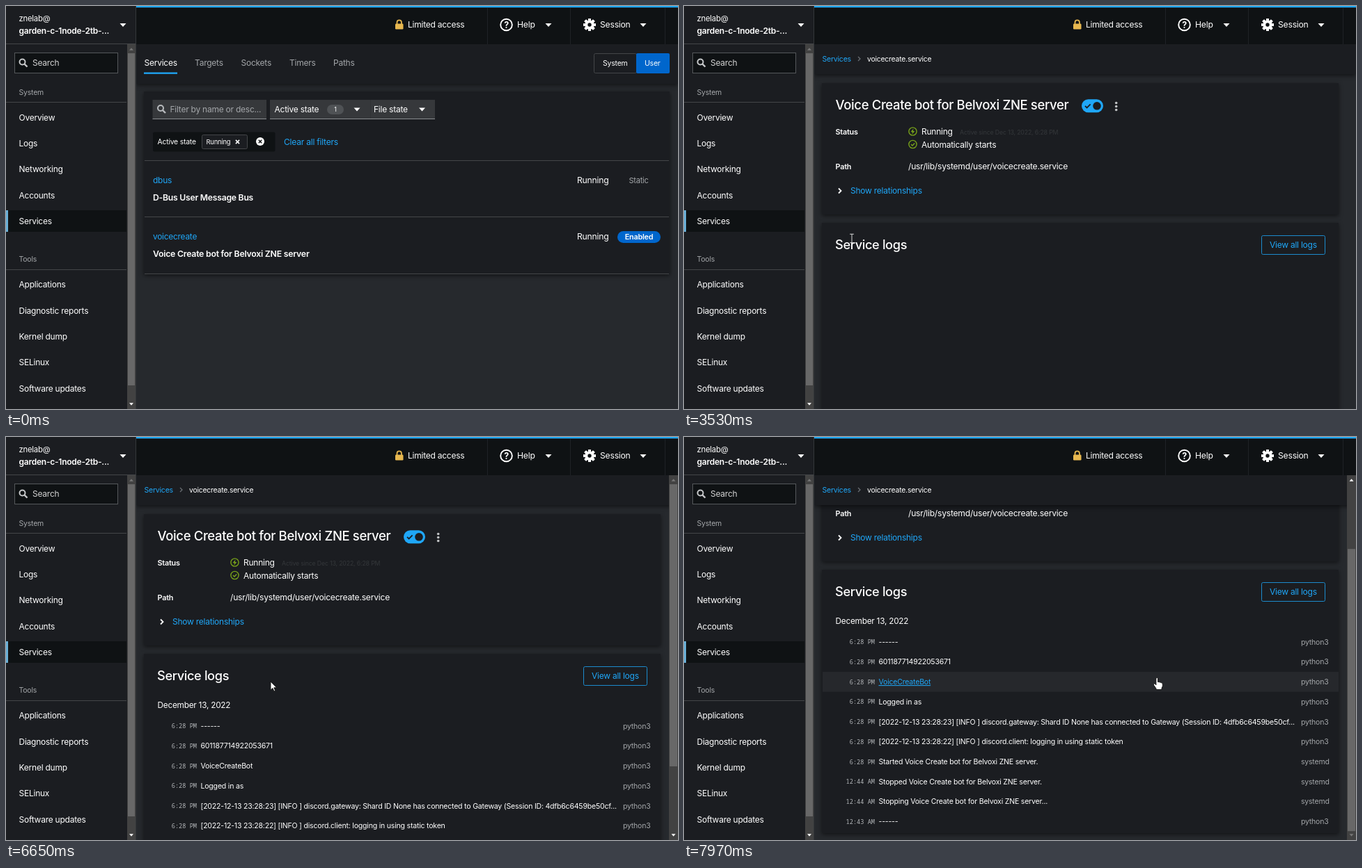
Write an HTML page that moves like this. It is 965 px wide and 580 px high and loops after 8 s.

```html
<!DOCTYPE html>
<html lang="en">
<head>
<meta charset="utf-8">
<title>Service manager</title>
<style>
html, body { margin: 0; height: 100%; overflow: hidden; background: #26292d; }
svg { display: block; width: 100%; height: 100%; }
text { font-family: Inter, Roboto, sans-serif; letter-spacing: -.02em; white-space: pre; }
.mono { font-family: "Noto Sans Mono", "DejaVu Sans Mono", monospace; letter-spacing: 0; }
.card { fill: #1b1d21; filter: drop-shadow(0 2px 3px #0008); }
.hover text.msg { fill: #1fa7f8; text-decoration: underline; }
.hover .row { fill: #26282c; }
</style>
</head>
<body>
<svg id="stage" viewBox="0 0 965 580"></svg>
<script>
const WHITE = '#fff', GREY = '#a3a6a9', BLUE = '#1fa7f8', PANEL = '#1b1d21', DARK = '#0f1214', LINE = '#444649';
const TRACK = '#424242', THUMB = '#686868';
const BOT = 'Voice Create bot for Belvoxi ZNE server';
const ROW_TOP = 401.5, ROW_H = 28.72;

// y is the middle of the capitals
const text = (x, y, s, size = 12, fill = WHITE, extra = '') =>
  `<text x="${x}" y="${y + size * .36}" font-size="${size}" fill="${fill}" ${extra}>${s}</text>`;
const rect = (x, y, w, h, fill, extra = '') =>
  `<rect x="${x}" y="${y}" width="${w}" height="${h}" fill="${fill}" ${extra}/>`;
const path = (d, stroke, width = 1, extra = '') =>
  `<path d="${d}" fill="none" stroke="${stroke}" stroke-width="${width}" ${extra}/>`;
const circle = (x, y, r, fill, extra = '') => `<circle cx="${x}" cy="${y}" r="${r}" fill="${fill}" ${extra}/>`;
const caret = (x, y, fill = WHITE, w = 4.5, h = 2.5) =>
  `<path d="M${x - w} ${y - h}h${2 * w}l${-w} ${2 * h}z" fill="${fill}"/>`;
const lens = (x, y, fill) => path(`M${x + 3} ${y + 3}l4 4`, fill, 2.4) +
  circle(x, y, 4, 'none', `stroke="${fill}" stroke-width="2"`);
const cross = (x, y, r, stroke, w) => path(`M${x - r} ${y - r}l${2 * r} ${2 * r}m0 ${-2 * r}l${-2 * r} ${2 * r}`, stroke, w);
const bold = 'font-weight="600"';

function sidebar() {
  const item = (s, i, top) => text(18.5, top + i * 37.3, s);
  return rect(0, 0, 187, 580, PANEL) +
    text(18.5, 17.5, 'znelab@', 11.3) + text(18.5, 36, 'garden-c-1node-2tb-...', 12, WHITE, bold) +
    caret(168, 27.5) + path('M0 54.5H186', LINE) +
    rect(12.5, 67.5, 148, 29, DARK, 'stroke="#55585b"') + lens(23.5, 80.5, '#c6c8ca') + text(38, 82, 'Search', 12, '#d2d2d2') +
    text(18.5, 124, 'System', 10.5, GREY) + path('M0 138.5H173', LINE) +
    rect(0, 294, 173, 31, DARK) + rect(0, 294, 3, 31, '#6ab0d8') +
    ['Overview', 'Logs', 'Networking', 'Accounts', 'Services'].map((s, i) => item(s, i, 160.5)).join('') +
    text(18.5, 364.5, 'Tools', 10.5, GREY) + path('M0 379.5H173', LINE) +
    ['Applications', 'Diagnostic reports', 'Kernel dump', 'SELinux', 'Software updates']
      .map((s, i) => item(s, i, 401)).join('') +
    rect(174, 55, 12, 525, TRACK) + rect(175, 68, 10, 478, THUMB) +
    caret(180, 62, '#777', 3, -1.7) + caret(180, 573, WHITE, 3, 1.7) +
    path('M186.5 0V580', '#34373a');
}

function header() {
  const teeth = [...Array(8)].map((_, i) =>
    rect(836, 18, 4, 18, WHITE, `rx="1" transform="rotate(${i * 45} 838 27)"`)).join('');
  return rect(187, 0, 778, 55, DARK) + rect(187, 0, 778, 2.2, BLUE) +
    path('M691.5 3V55M810.5 3V55M946.5 3V55', '#1f2226') +
    rect(559, 25.5, 11.5, 8, '#e8b84f', 'rx="1.3"') + path('M561.5 26V23.5a3.2 3.2 0 0 1 6.4 0V26', '#e8b84f', 1.8) +
    text(577, 27, 'Limited access') +
    circle(718.5, 27, 8.3, 'none', `stroke="${WHITE}" stroke-width="1.9"`) +
    text(718.5, 27.2, '?', 12.5, WHITE, 'font-weight="700" text-anchor="middle"') +
    text(734, 27, 'Help', 12.2) + caret(779, 27.5) +
    teeth + circle(838, 27, 6.6, WHITE) + circle(838, 27, 2.7, DARK) +
    text(853, 27, 'Session', 12.2) + caret(915, 27.5);
}

function listPage() {
  const tabs = [['Services', 198.5], ['Targets', 271], ['Sockets', 337.5], ['Timers', 407], ['Paths', 470]];
  return rect(187, 55, 778, 57, PANEL, 'class="card"') +
    tabs.map(([s, x], i) => text(x, 82, s, 12, i ? GREY : WHITE)).join('') + rect(198, 95.5, 48, 2.3, BLUE) +
    rect(844.5, 68.5, 61, 28, PANEL, `rx="2" stroke="${LINE}"`) + text(857, 82.5, 'System', 10.5) +
    rect(905, 68, 48, 29, '#06c', 'rx="2"') + text(917, 82.5, 'User', 10.5) +
    rect(198, 123, 755, 263, PANEL, 'class="card"') +
    rect(210.5, 135, 163.5, 28, '#36383b') + lens(222, 147, '#b8bbbe') +
    text(235.5, 149, 'Filter by name or desc...', 12, GREY) +
    rect(379, 135, 237, 28, '#36383b') + path('M210.5 162.5H374M379 162.5H616', '#8a8d90') +
    text(385.5, 149, 'Active state') + rect(461, 142, 24, 14, '#4f5255', 'rx="7"') +
    text(473, 149, '1', 9, WHITE, 'text-anchor="middle"') + caret(504, 149) + path('M523.5 135V162', '#303235') +
    text(528, 149, 'File state') + caret(597.5, 149) +
    rect(211, 181.5, 175.5, 28, DARK, 'rx="2"') + text(217.5, 195.5, 'Active state', 10.4) +
    rect(281.5, 185.5, 65, 20, PANEL, `rx="2" stroke="${LINE}"`) + text(287.5, 195.5, 'Running', 9.4) +
    cross(332.5, 195.5, 2.6, WHITE, 1.6) + circle(365, 195, 6, WHITE) + cross(365, 195, 2.2, DARK, 1.6) +
    text(399, 195.5, 'Clear all filters', 12.1, BLUE) +
    path('M199 222.5H952M199 303.5H952M199 385.5H952', LINE) +
    text(211, 250.5, 'dbus', 12, BLUE) + text(211, 275.5, 'D-Bus User Message Bus', 12.2, WHITE, bold) +
    text(820, 250.5, 'Running', 12.2) + text(894.5, 251, 'Static', 11, GREY) +
    text(211, 332, 'voicecreate', 11.9, BLUE, 'id="link"') + text(211, 357, BOT, 12.3, WHITE, bold) +
    text(820, 332, 'Running', 12.2) + rect(878, 324, 62, 17, '#06c', 'rx="8.5"') +
    text(909, 332.5, 'Enabled', 10.8, WHITE, bold + ' text-anchor="middle"');
}

function logRows() {
  const rows = [
    '------', '601187714922053671', 'VoiceCreateBot', 'Logged in as',
    '[2022-12-13 23:28:23] [INFO ] discord.gateway: Shard ID None has connected to Gateway (Session ID: 4dfb6c6459be50cf...',
    '[2022-12-13 23:28:22] [INFO ] discord.client: logging in using static token',
    `Started ${BOT}.`, `Stopped ${BOT}.`, `Stopping ${BOT}...`, '------'];
  return rows.map((s, i) => {
    const y = ROW_TOP + ROW_H * (i + .5);
    const time = i < 7 ? '6:28 PM' : i < 9 ? '12:44 AM' : '12:43 AM';
    return '<g class="log">' + rect(199, y - ROW_H / 2, 741, ROW_H, 'none', 'class="row"') +
      text(274, y + .3, time, 8.65, '#b4b7ba', 'class="mono" text-anchor="end"') +
      text(279.5, y, s, 10.55, WHITE, 'class="msg"') +
      text(886, y, i > 5 && i < 9 ? 'systemd' : 'python3', 10.5, GREY) + '</g>';
  }).join('');
}

function detailPage() {
  const green = '#78a21a', ring = y => circle(328.5, y, 5.6, 'none', `stroke="${green}" stroke-width="1.4"`);
  return '<g clip-path="url(#view)"><g id="scroll">' +
    rect(198, 111, 742, 189, PANEL, 'class="card"') +
    text(217.5, 142.5, BOT, 18.5, WHITE, 'font-weight="500"') +
    rect(571, 134.3, 31, 19, BLUE, 'rx="9.5"') + circle(593, 143.8, 5.8, PANEL) + path('M576 143.8l2.6 2.6 5-5', PANEL, 1.8) +
    [139.5, 144.5, 149.5].map(y => circle(620.7, y, 1.8, '#c0c2c4')).join('') +
    text(217.5, 181.5, 'Status', 10.8, WHITE, bold) + ring(180.5) +
    `<path d="M329.5 176.5l-4 4.8h2.5l-.6 3.4 4-4.8h-2.5z" fill="${green}"/>` +
    text(341, 181, 'Running') + text(396, 182, 'Active since Dec 13, 2022, 6:28 PM', 8.8, '#34373a') +
    ring(199) + path('M326 199l2 2 3.2-3.4', green, 1.5) + text(341, 199.5, 'Automatically starts') +
    text(217.5, 231, 'Path', 10.8, WHITE, bold) + text(322, 230.5, '/usr/lib/systemd/user/voicecreate.service', 12.15) +
    path('M222 262.5l3.5 3.5-3.5 3.5', WHITE, 1.8) + text(239, 266, 'Show relationships', 12, BLUE) +
    rect(198, 312, 742, 379, PANEL, 'class="card"') +
    text(217, 343.5, 'Service logs', 18.2, WHITE, 'font-weight="500"') +
    rect(829.5, 330.5, 91, 27, 'none', 'rx="2" stroke="#1c8bcd"') + text(841, 343.8, 'View all logs', 12, BLUE) +
    `<g class="loaded">${text(217.5, 385.5, 'December 13, 2022', 11.8)}${logRows()}</g></g></g>` +
    rect(187, 55, 778, 43, PANEL, 'class="card"') +
    text(198.5, 76, 'Services', 10.5, BLUE) + path('M250 73l3 3-3 3', '#6a6e73', 1.3) +
    text(263, 76, 'voicecreate.service', 10.4) +
    '<g class="loaded">' + rect(952, 55, 13, 525, TRACK) + rect(953, 68, 11, 406, THUMB, 'id="thumb"') +
    `<g id="up">${caret(958.5, 62, 'currentColor', 3, -1.7)}</g><g id="down">${caret(958.5, 573, 'currentColor', 3, 1.7)}</g></g>`;
}

const shape = d => `<path d="${d}" fill="#fff" stroke="#111" stroke-width=".9" stroke-linejoin="round"/>`;
const cursors = {
  arrow: shape('M0 0V12.3L2.9 9.5 5 14 6.8 13.3 4.8 8.8H8.6Z'),
  hand: shape('M-1.6 1.2Q-1.6 0-.3 0T1 1.2V6L3 6.2 5 6.8 7 7.6Q7.8 8 7.8 9.5V12L6.5 15V17H-1.5V15.4L-5 10.5Q-5.6 9-4.3 8.6T-1.6 10.5Z'),
  beam: path('M-2.8-6.2H2.8M0-6.2V6.2M-2.8 6.2H2.8', '#d8d8d8')
};

const stage = document.getElementById('stage');
stage.innerHTML = '<clipPath id="view"><path d="M187 98H965V580H187z"/></clipPath>' +
  rect(187, 55, 778, 525, '#26292d') + `<g id="list">${listPage()}</g><g id="detail">${detailPage()}</g>` +
  header() + sidebar() + Object.keys(cursors).map(c => `<g id="${c}">${cursors[c]}</g>`).join('');

const $ = id => document.getElementById(id);
const show = (el, on) => el.style.display = on ? '' : 'none';
const loaded = document.querySelectorAll('.loaded'), logs = document.querySelectorAll('.log');

// Keys are [step, x, y] and [step, offset]; one step is STEP ms
const START = 488, STEP = 66.1;
const moves = [
  [0, 958, 95], [5, 936, 86], [8, 928, 82], [10, 927, 84], [11, 927, 84], [13, 931, 85], [14, 931, 85], [15, 932.5, 85],
  [29, 932.5, 85], [30, 915, 88], [32, 800, 130], [34, 520, 235], [37, 312, 306], [39, 262, 325], [42, 241, 334.5],
  [58, 241, 334.5], [63, 335, 340], [65, 388, 343], [67, 350, 345], [70, 269, 349.5], [71, 270, 349],
  [75, 300, 343], [76, 314, 340], [78, 260, 338], [79, 270, 340], [80, 270, 340], [82, 246, 339],
  [89, 246, 339], [93, 380, 352], [97, 560, 362], [100, 596, 357], [102, 600, 355], [113, 679.5, 346.5]];
const scrolls = [[99, 0], [100, 38], [101, 85], [102, 112], [103, 121]];

function at(keys, k) {
  const i = keys.findIndex(key => key[0] >= k);
  if (i < 1) return keys[i < 0 ? keys.length - 1 : 0].slice(1);
  const [a, b] = [keys[i - 1], keys[i]], u = (k - a[0]) / (b[0] - a[0]);
  return a.slice(1).map((v, j) => v + (b[j + 1] - v) * u);
}

function draw(now) {
  const k = Math.floor((now % 8000 - START) / STEP);
  const [x, y] = at(moves, k), [offset] = at(scrolls, k);
  const inside = (l, t, r, b) => x >= l && x < r && y >= t && y < b;
  const onList = k < 44, onDetail = k >= 46, hasLogs = k >= 52;

  show($('list'), onList);
  show($('detail'), onDetail);
  loaded.forEach(el => show(el, hasLogs));
  $('scroll').setAttribute('transform', `translate(0 ${-offset})`);
  $('thumb').setAttribute('y', 68 + offset * .77);
  $('up').style.color = offset > 0 ? WHITE : '#777';
  $('down').style.color = offset < 121 ? WHITE : '#777';

  const onLink = onList && inside(211, 325, 275, 340);
  const row = hasLogs && inside(199, 98, 940, 580) ? Math.floor((y + offset - ROW_TOP) / ROW_H) : -1;
  $('link').style.textDecoration = onLink ? 'underline' : '';
  logs.forEach((el, i) => el.classList.toggle('hover', i === row));

  let kind = 'arrow';
  if (onLink || row >= 0 || onList && inside(845, 68, 953, 97)) kind = 'hand';
  else if (onDetail && inside(217, 330 - offset, 321, 355 - offset)) kind = 'beam';
  for (const c in cursors) show($(c), k >= 0 && c === kind);
  $(kind).setAttribute('transform', `translate(${x} ${y})`);
  requestAnimationFrame(draw);
}
requestAnimationFrame(draw);
</script>
</body>
</html>
```
